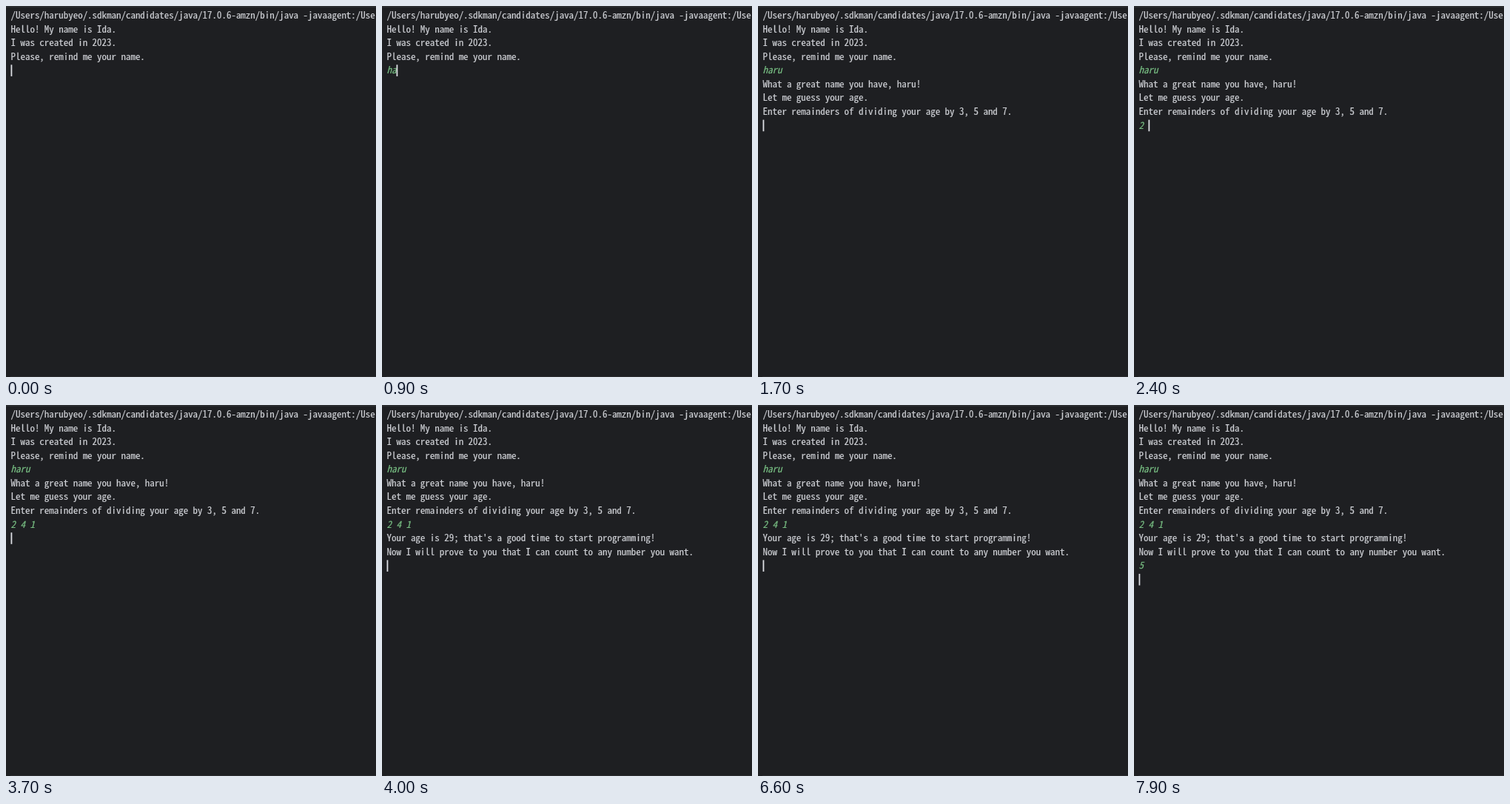
These frames come from a looping animation (500 px wide and 501 px high, 8 s). An HTML page:

```html
<!DOCTYPE html>
<html lang="en">
<head>
<meta charset="utf-8">
<title>Console session</title>
<style>
  html, body { margin: 0; width: 100%; height: 100%; overflow: hidden; background: #1e1f22; }
  svg { display: block; width: 500px; height: 501px; }
  text {
    font: 12.96px "Noto Sans Mono CJK KR", "Noto Sans Mono CJK JP", "Noto Sans Mono", monospace;
    fill: #cfd1d6;
    stroke: #cfd1d6;
    stroke-width: 0.2px;
    white-space: pre;
  }
  .input { font-style: italic; fill: #77bd82; stroke: #77bd82; }
  .edge { fill: #2b2d30; }
  #caret { fill: #dcdee3; }
</style>
</head>
<body>
<svg id="stage" viewBox="0 0 500 501">
  <rect class="edge" width="500" height="2"/>
  <rect class="edge" x="6" y="500" width="494" height="1"/>
  <rect id="caret" width="1.8" height="15.6"/>
</svg>
<script>
const LOOP = 8000, TICK = 100, BLINK = 500, BLINK_START = 100;
const LEFT = 6.5, PITCH = 6.48, LEADING = 18.58, BASELINE = 17, CARET_TOP = 5;

const stage = document.getElementById("stage");
const caret = document.getElementById("caret");
const rows = [];
const events = [];   // caret positions over time

function addRow(text, kind) {
  const node = document.createElementNS("http://www.w3.org/2000/svg", "text");
  node.setAttribute("class", kind);
  node.setAttribute("x", LEFT);
  node.setAttribute("y", BASELINE + rows.length * LEADING);
  stage.insertBefore(node, caret);
  rows.push({ node, text });
}

function print(at, ...texts) {
  texts.forEach(text => addRow(text, "output"));
  events.push({ at, row: rows.length, col: 0 });
}

// Keys speed up after the first one; Enter moves the caret down.
function type(text, first, last, enter) {
  const row = rows.length;
  for (let i = 0; i < text.length; i++) {
    const done = text.length > 1 ? i / (text.length - 1) : 0;
    const delay = (last - first) * done ** 0.6;
    events.push({ at: first + Math.round(delay / TICK) * TICK, row, col: i + 1 });
  }
  addRow(text, "input");
  events.push({ at: enter, row: row + 1, col: 0 });
}

print(-LOOP,
  "/Users/harubyeo/.sdkman/candidates/java/17.0.6-amzn/bin/java -javaagent:/Users/harubyeo",
  "Hello! My name is Ida.",
  "I was created in 2023.",
  "Please, remind me your name.");
type("haru", 500, 1200, 1500);
print(1700,
  "What a great name you have, haru!",
  "Let me guess your age.",
  "Enter remainders of dividing your age by 3, 5 and 7.");
type("2 4 1", 2100, 2900, 3700);
print(4000,
  "Your age is 29; that's a good time to start programming!",
  "Now I will prove to you that I can count to any number you want.");
type("5", 6900, 6900, 7900);

function draw(t) {
  const { at, row, col } = events.findLast(e => e.at <= t);
  rows.forEach(({ node, text }, i) => {
    const shown = i < row ? text : i === row ? text.slice(0, col) : "";
    if (node.textContent !== shown) node.textContent = shown;
  });

  // Steady clock blink, held on just after any activity.
  const phase = (t - BLINK_START + 2 * BLINK) % (2 * BLINK);
  const on = phase >= BLINK || t - at < BLINK;
  caret.setAttribute("x", LEFT + col * PITCH);
  caret.setAttribute("y", CARET_TOP + row * LEADING);
  caret.setAttribute("visibility", on ? "visible" : "hidden");
}

const start = performance.now();
function frame() {
  draw((performance.now() - start) % LOOP);
  requestAnimationFrame(frame);
}
frame();
</script>
</body>
</html>
```
